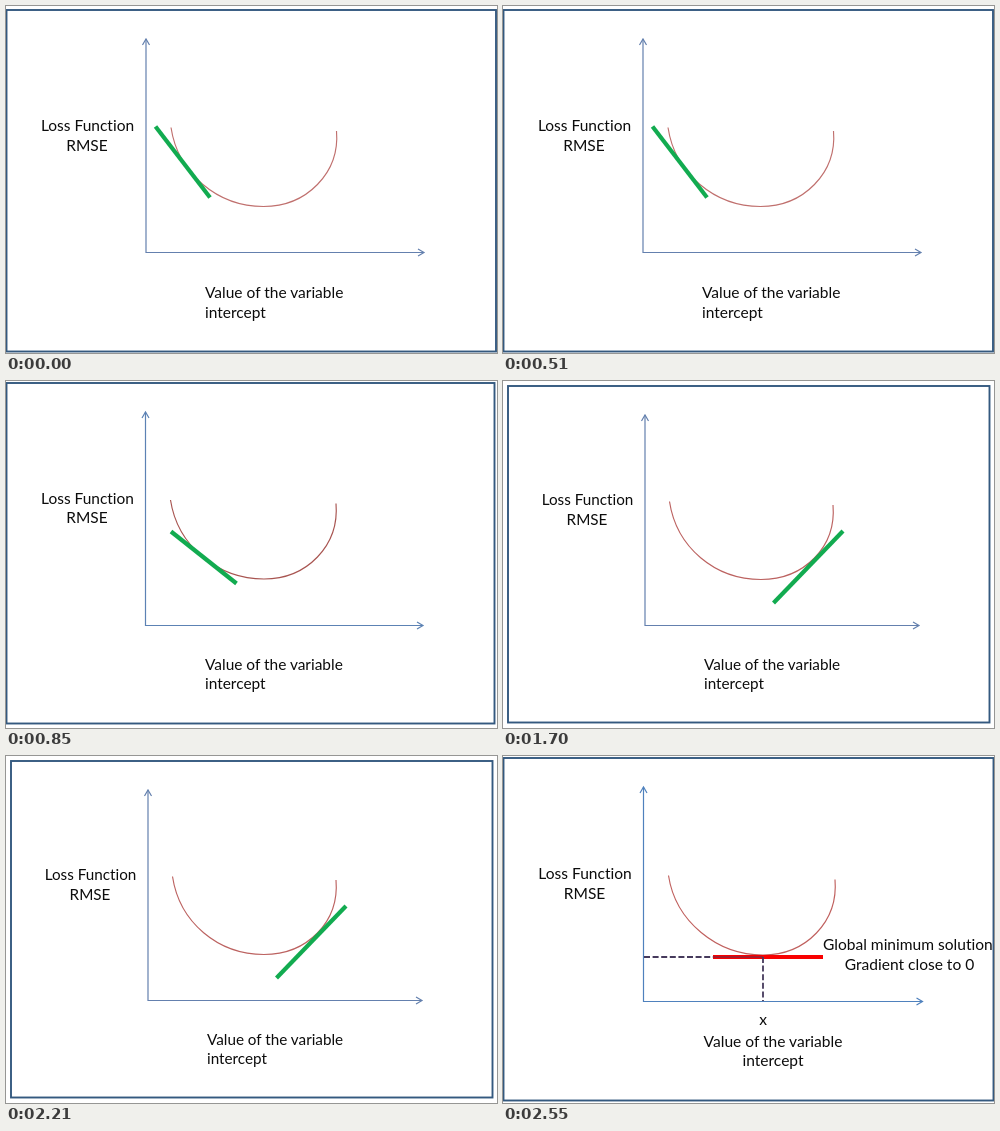
An HTML page that plays this animation: 491x347 px, repeating every 3.4 s.

```html
<!DOCTYPE html>
<html lang="en">
<head>
<meta charset="utf-8">
<title>Gradient descent</title>
<style>
html, body { margin: 0; width: 100%; height: 100%; overflow: hidden; background: #fff; }
svg { display: block; width: 100vw; height: 100vh; }
text { font-family: Lato, "Open Sans", sans-serif; font-variant-ligatures: none; fill: #0c0c0c; }
path, rect { fill: none; }
</style>
</head>
<body>
<svg id="stage" viewBox="0 0 491 347" preserveAspectRatio="none"></svg>
<script>
const HOLD = 850;
const stage = document.getElementById("stage");

// box: frame edges; axes: left, top, right, bottom; curve: start, lowest point, end
const steps = [
  { box: [0.5, 4, 490, 345.5], axes: [140, 33, 418, 246.5], curve: [165, 121.5, 257.5, 200.5, 330.5, 125],
    label: [81.5, 125, 145], caption: [199, 291.5, 311.5], size: 15.5,
    tangent: [149.5, 120.5, 204, 191.5], color: "#12ab50", axisColor: "#6480ae", curveColor: "#c0706e" },
  { box: [0.5, 2, 488.5, 342.5], axes: [139.5, 31, 417, 244.5], curve: [164.5, 119, 258, 198, 330, 122.5],
    label: [81.5, 122.5, 142], caption: [199, 288.5, 308], size: 15.45,
    tangent: [165, 150.5, 230.5, 202.5], color: "#12ab50", axisColor: "#5c82b4", curveColor: "#a85450" },
  { box: [5, 5, 486.5, 341.5], axes: [142, 34, 416, 244.5], curve: [166.5, 120.5, 258, 198.5, 330, 124],
    label: [84.5, 124, 143.5], caption: [201, 288.5, 308], size: 15.25,
    tangent: [270.5, 222, 340, 150], color: "#12ab50", axisColor: "#6480ae", curveColor: "#bc6260" },
  { box: [0.5, 2, 490.5, 344.5], axes: [140.5, 31, 419.5, 245.5], curve: [165.5, 119.5, 260, 199, 332, 123.5],
    label: [82, 123, 143], caption: [270, 290.5, 309.5], size: 15.55,
    tangent: [210, 201, 320, 201], color: "#f80000", axisColor: "#4f81bd", curveColor: "#c0605e", solved: true }
];

const line = (d, color, width, extra = "") =>
  `<path d="${d}" stroke="${color}" stroke-width="${width}" ${extra}/>`;

const text = (s, x, y, size, anchor = "middle") =>
  `<text x="${x}" y="${y}" font-size="${size}" text-anchor="${anchor}">${s}</text>`;

function axes([l, t, r, b], color) {
  return line(`M${l} ${t}V${b}H${r}`, color, 1.2) +
    line(`M${l - 3.5} ${t + 6}L${l} ${t}L${l + 3.5} ${t + 6}M${r - 6} ${b - 3.5}L${r} ${b}L${r - 6} ${b + 3.5}`, color, 1.2);
}

function bowl([x0, y0, x1, y1, x2, y2], color) {
  const d = `M${x0} ${y0}C${x0 + 7} ${y0 + 46} ${x1 - 46} ${y1} ${x1} ${y1}` +
    `C${x1 + 43} ${y1} ${x2 + 3.5} ${y2 + 42} ${x2} ${y2}`;
  return line(d, color, 1.15);
}

function solution(size) {
  const dash = 'stroke-dasharray="6 2.6"';
  const ink = "#463a5c";
  return line("M141 201H210", ink, 1.8, dash) +
    line("M210 201H260", ink, 2, 'opacity="0.45"') +
    line("M260 201V245", ink, 1.8, dash) +
    text("x", 260, 268.5, size) +
    text("Global minimum solution", 320, 194, size, "start") +
    text("Gradient close to 0", 406.5, 214, size);
}

function draw(s) {
  const [l, t, r, b] = s.box;
  const [lx, ly1, ly2] = s.label;
  const [cx, cy1, cy2] = s.caption;
  const [x0, y0, x1, y1] = s.tangent;
  const anchor = s.solved ? "middle" : "start";
  return axes(s.axes, s.axisColor) + bowl(s.curve, s.curveColor) +
    line(`M${x0} ${y0}L${x1} ${y1}`, s.color, 4.2) +
    text("Loss Function", lx, ly1, s.size) + text("RMSE", lx - 0.5, ly2, s.size) +
    text("Value of the variable", cx, cy1, s.size, anchor) +
    text("intercept", cx, cy2, s.size, anchor) +
    (s.solved ? solution(s.size) : "") +
    `<rect x="${l}" y="${t}" width="${r - l}" height="${b - t}" stroke="#34597f" stroke-width="1.9"/>`;
}

let shown = -1;
function update(now) {
  const i = Math.floor(now / HOLD) % steps.length;
  if (i !== shown) stage.innerHTML = draw(steps[shown = i]);
}

const start = performance.now();
function tick() {
  update(performance.now() - start);
  requestAnimationFrame(tick);
}
tick();
</script>
</body>
</html>
```
